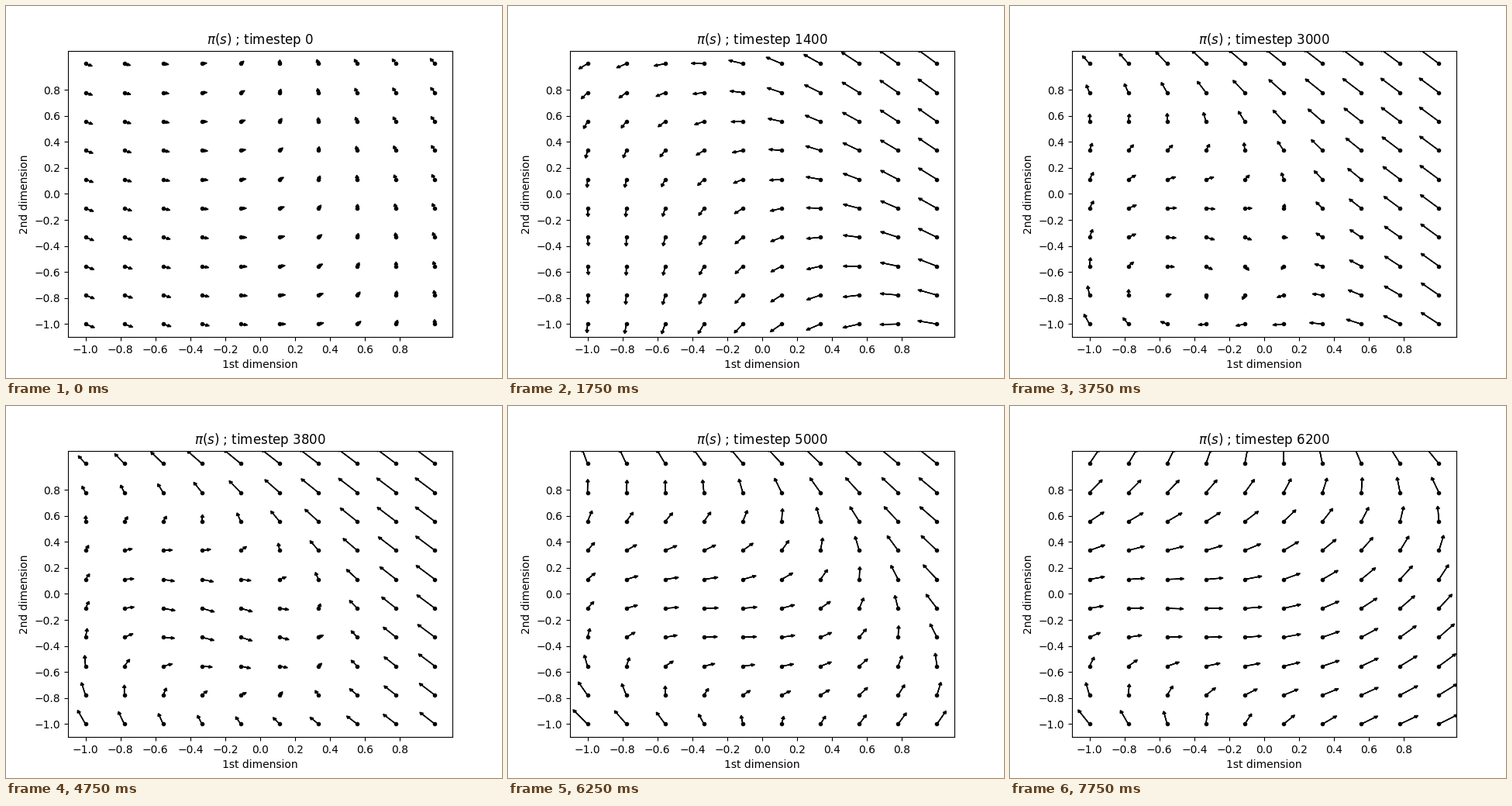
Animation of 640x480 px, one loop 8 s. Source, as a matplotlib script:

```python
import numpy as np
import matplotlib.pyplot as plt
from matplotlib.animation import FuncAnimation

FRAMES, INTERVAL = 32, 250
STEP = 200            # training steps per frame
N = 10                # arrows per side
MAX_ACTION = 0.1
HEAD = 0.02


# The policy is tanh of a smooth surface; each stage returns the surfaces for
# the horizontal and vertical action over the state (x, y).
def untrained(x, y):
    return (0.1 - 0.185 * x - 0.075 * y,
            0.025 + 0.17 * x + 0.045 * y)


def leftward(x, y):
    return (-0.44 - 0.75 * x - 0.3 * x**2 - 0.17 * y - 0.2 * y**2,
            -0.18 + 0.68 * x + 0.4 * x**2 + 0.43 * y + 0.06 * y**2 + 0.32 * x * y)


def upper_left(x, y):
    return (-0.35 - 0.83 * x - 0.48 * x**2 - 0.27 * y - 0.62 * y**2
            + 0.45 * x**2 * y**2,
            0.1 + 0.8 * x + 0.7 * x**2 + 0.75 * y + 0.4 * y**2
            + 0.35 * x * y - 0.45 * x**2 * y**2)


def swirl(x, y):
    return (0.1 - 0.93 * x - 0.87 * x**2 - 0.41 * y - 0.9 * y**2
            - 0.38 * x * y + 0.47 * x**2 * y**2,
            0.14 + 0.63 * x + 0.88 * x**2 + 0.84 * y + 0.62 * y**2
            + 0.46 * x * y - 0.47 * x**2 * y - 0.44 * x**2 * y**2)


def core(x, y):
    return (0.4 - 0.87 * x - 1.13 * x**2 - 0.56 * y - 1.19 * y**2
            - 0.6 * x * y + 0.7 * x**2 * y**2,
            -0.08 + 0.65 * x + 1.03 * x**2 + 0.66 * y + 1.12 * y**2
            + 0.84 * x * y - 0.27 * x**2 * y - 0.49 * x**2 * y**2)


def fan(x, y):
    return (0.66 - 0.5 * x - 0.86 * x**2 - 0.38 * y - 1.03 * y**2
            - 0.69 * x * y + 0.48 * x * y**2 + 0.64 * x**2 * y**2,
            0.2 + 0.7 * x + 0.85 * x**2 + 0.75 * y + y**2
            + x * y + 0.2 * x**2 * y + 0.4 * x**2 * y**2)


def rightward(x, y):
    return (1.07 - 0.07 * x - 0.37 * x**2 - 0.18 * y - 0.82 * y**2
            - 0.85 * x * y - 0.1 * x**2 * y + 0.31 * x * y**2 + 0.31 * x**2 * y**2,
            0.21 + 0.8 * x + 0.72 * x**2 + 0.6 * y + 1.05 * y**2
            + 0.48 * x * y - 0.78 * x * y**2 - 0.2 * x**2 * y**2)


STAGES = [(0, untrained), (7, leftward), (10, upper_left), (15, swirl),
          (19, core), (25, fan), (31, rightward)]


def policy(frame, x, y):
    """Actions at the given frame, blended between the neighbouring stages."""
    for (start, a), (end, b) in zip(STAGES, STAGES[1:]):
        if frame <= end:
            t = (frame - start) / (end - start)
            before, after = np.tanh(a(x, y)), np.tanh(b(x, y))
            return MAX_ACTION * ((1 - t) * before + t * after)


grid = np.linspace(-1, 1, N)
xs, ys = (g.ravel() for g in np.meshgrid(grid, grid))

fig, ax = plt.subplots(figsize=(6.4, 4.8), dpi=100)
ax.plot(xs, ys, "k.")
arrows = [ax.arrow(x, y, 0.01, 0, head_width=HEAD, head_length=HEAD, fc="k", ec="k")
          for x, y in zip(xs, ys)]

ticks = np.arange(-10, 10, 2) / 10
ax.set(xlim=(-1.1, 1.1), ylim=(-1.1, 1.1), xticks=ticks, yticks=ticks,
       xlabel="1st dimension", ylabel="2nd dimension")
title = ax.set_title("")


def update(frame):
    for arrow, dx, dy in zip(arrows, *policy(frame, xs, ys)):
        arrow.set_data(dx=dx, dy=dy)
    title.set_text(rf"$\pi(s)$ ; timestep {frame * STEP}")
    return [*arrows, title]


anim = FuncAnimation(fig, update, frames=FRAMES, interval=INTERVAL,
                     repeat=True, blit=False)
plt.show()
```
